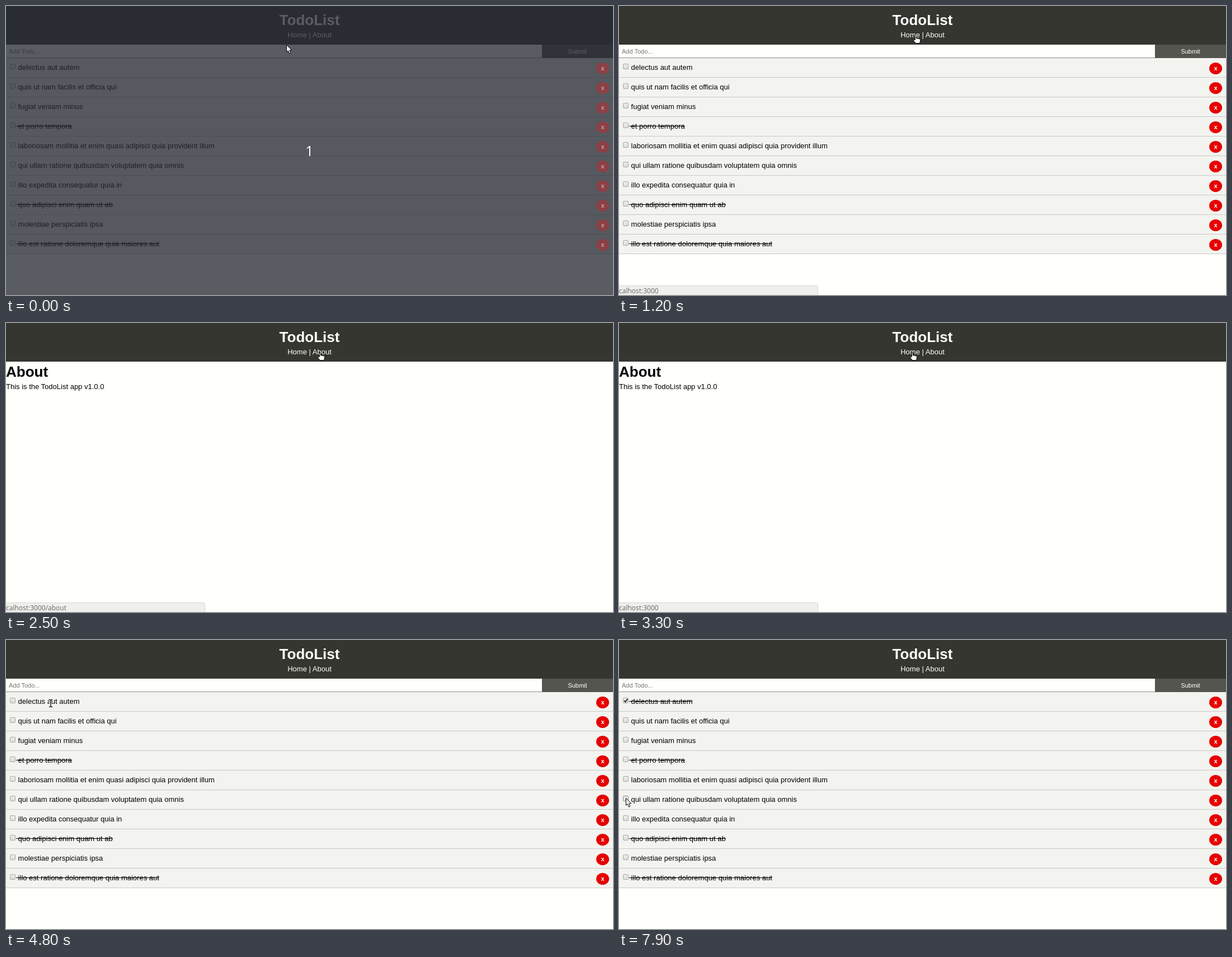
Write an HTML page that moves like this. It is 1085 by 516 pixels and loops after 8000 ms.

```html
<!DOCTYPE html>
<html lang="en">
<head>
<meta charset="utf-8">
<title>TodoList</title>
<style>
html, body { margin: 0; width: 100%; height: 100%; overflow: hidden; }
body { position: relative; background: #fffffc; color: #000; font: 13px/15px "Liberation Sans", Arial, sans-serif; }
body * { box-sizing: border-box; }
h1, p { margin: 0; }
h1 { font-size: 26px; line-height: 30px; }
header { height: 69px; padding-top: 10px; background: #363631; color: #fffffc; text-align: center; }
header p { margin-top: 4px; }
[hidden] { display: none !important; }
.form { display: flex; height: 24px; font-size: 11px; line-height: 24px; }
.field { width: 958px; padding-left: 5px; border-bottom: 1px solid #8c8c89; color: #757573; }
.submit { flex: 1; background: #555550; color: #fffffc; text-align: center; }
.row { position: relative; height: 35px; padding: 9px 0 0 18px; background: #f3f3f0; border-bottom: 1px solid #c9c9c6; white-space: pre; }
.done span { text-decoration: line-through; }
.box { position: absolute; left: 7px; top: 10px; width: 10px; height: 10px; border: 1px solid #a9a9a7; border-radius: 2px; background: linear-gradient(#ececea, #dcdcda); }
.box.hover { border-color: #8e8e8c; }
.box svg { position: absolute; left: 0; top: 0; }
.del { position: absolute; left: 1055px; top: 8px; width: 23px; height: 21px; border-radius: 50%; background: #e60000; color: #fffffc; font: bold 11px/20px "Liberation Sans", Arial, sans-serif; text-align: center; }
.counting .del { z-index: 2; background: #8c4046; color: #bda3a6; }
#about { padding-top: 3px; }
#about p { margin-top: 4px; }
#status { position: absolute; left: 0; top: 499px; width: 356px; height: 18px; border: solid #d6d6d3; border-width: 1px 1px 0 0; border-radius: 0 4px 0 0; background: #efefec; color: #666664; font: 12px/17px "Open Sans", "Noto Sans", sans-serif; }
#shade { position: absolute; inset: 0; z-index: 1; background: rgba(38, 41, 50, .76); }
#count { position: absolute; z-index: 3; left: 0; right: 0; top: 241px; color: #fff; font: 25px/34px "Open Sans", "Noto Sans", sans-serif; text-align: center; }
#cursor { position: absolute; z-index: 4; left: 0; top: 0; overflow: visible; }
</style>
</head>
<body>
<header><h1>TodoList</h1><p>Home | About</p></header>
<main id="home">
  <div class="form"><div class="field">Add Todo...</div><div class="submit">Submit</div></div>
  <div id="list"></div>
</main>
<main id="about"><h1>About</h1><p>This is the TodoList app v1.0.0</p></main>
<div id="status"></div>
<div id="shade"></div>
<div id="count">1</div>
<svg id="cursor" width="14" height="18" fill="#fff" stroke="#000" stroke-linejoin="round">
  <path id="arrow" d="M.5 .5V13.3L3.4 10.7L5.6 16L7.9 15L5.7 9.9H9.8Z"/>
  <path id="hand" d="M3.3 7.5V1.6Q3.3 .5 4.4 .5T5.5 1.6V5L7.6 4.8L9.7 5.4L11.6 6Q12.5 6.4 12.5 7.6V10L11.4 13.5H4.4L.7 9Q.2 7.8 1.4 7.2Z"/>
  <g id="beam" fill="none">
    <path id="stem" d="M1 1.5H2.5L4 2.5L5.5 1.5H7M4 2.5V13.5M1 14.5H2.5L4 13.5L5.5 14.5H7" stroke="#fff" stroke-width="3"/>
    <use href="#stem" style="display:none"/>
    <path d="M1 1.5H2.5L4 2.5L5.5 1.5H7M4 2.5V13.5M1 14.5H2.5L4 13.5L5.5 14.5H7" stroke-width="1.3"/>
  </g>
</svg>
<script>
const LOOP = 8000, STEP = 100;
const $ = id => document.getElementById(id);
const todos = [
  'delectus aut autem', 'quis ut nam facilis et officia qui', 'fugiat veniam minus',
  '*et porro tempora', 'laboriosam mollitia et enim quasi adipisci quia provident illum',
  'qui ullam ratione quibusdam voluptatem quia omnis', 'illo expedita consequatur quia in',
  '*quo adipisci enim quam ut ab', 'molestiae perspiciatis ipsa',
  '*illo est ratione doloremque quia maiores aut'
];
// A leading star marks a finished todo.
$('list').innerHTML = todos.map(s =>
  `<div class="row${s[0] === '*' ? ' done' : ''}"><i class="box"></i><span> ${s.replace('*', '')}</span><b class="del">x</b></div>`
).join('');
const rows = [...document.querySelectorAll('.row')];
const boxes = rows.map(r => r.firstChild);
boxes[0].innerHTML = '<svg width="9" height="9" fill="none" stroke="#333" stroke-width="2"><path d="M1.2 4.2L3.4 6.4L7.4 1.2"/></svg>';
const tick = boxes[0].firstChild;

// time, left, top, shape
const path = [
  [0, 501, 69, 'arrow'], [100, 505, 63, 'arrow'], [400, 521, 59, 'arrow'], [500, 521, 59, 'arrow'],
  [700, 528, 57, 'arrow'], [800, 528, 57, 'arrow'], [900, 524, 55, 'hand'], [1200, 526, 53, 'hand'],
  [1800, 526, 53, 'hand'], [2000, 540, 49, 'hand'], [2200, 557, 53, 'hand'], [3000, 557, 53, 'hand'],
  [3100, 531, 53, 'hand'], [3200, 531, 53, 'hand'], [3300, 520, 53, 'hand'], [3700, 520, 53, 'hand'],
  [3800, 480, 66, 'arrow'], [4200, 160, 108, 'arrow'], [4300, 120, 110, 'beam'], [4500, 120, 110, 'beam'],
  [4800, 76, 105, 'beam'], [5100, 40, 106, 'beam'], [5200, 24, 106, 'arrow'], [5400, 13, 107, 'arrow'],
  [5500, 13, 107, 'arrow'], [5600, 12, 108, 'arrow'], [6300, 12, 108, 'arrow'], [7000, 12, 273, 'arrow'],
  [7100, 12, 273, 'arrow'], [7400, 12, 287, 'arrow'], [7600, 12, 287, 'arrow'], [7900, 12, 282, 'arrow']
];

function cursorAt(t) {
  const i = path.findLastIndex(k => k[0] <= t);
  const a = path[i], b = path[i + 1] || a;
  const u = a === b ? 0 : (t - a[0]) / (b[0] - a[0]);
  return [a[1] + (b[1] - a[1]) * u, a[2] + (b[2] - a[2]) * u, a[3]].map(v => v.toFixed ? Math.round(v) : v);
}

function draw(now) {
  const t = Math.floor(now % LOOP / STEP) * STEP;
  const within = (a, b) => t >= a && t < b;
  const show = (id, on) => $(id).toggleAttribute('hidden', !on);

  const counting = t < 100;
  document.body.classList.toggle('counting', counting);
  show('shade', counting);
  show('count', counting);

  const about = within(2500, 3500);
  show('about', about);
  show('home', !about);
  show('status', within(1100, 4000));
  $('status').textContent = 'calhost:3000' + (within(2000, 3100) ? '/about' : '');

  const checked = t >= 5900;
  rows[0].classList.toggle('done', checked);
  tick.style.display = checked ? '' : 'none';

  const [x, y, shape] = cursorAt(t);
  $('cursor').style.transform = `translate(${x}px, ${y}px)`;
  for (const id of ['arrow', 'hand', 'beam']) $(id).style.display = id === shape ? '' : 'none';
  boxes.forEach((box, i) => {
    const top = 103 + 35 * i;
    box.classList.toggle('hover', shape === 'arrow' && x < 17 && y >= top && y < top + 10);
  });
  requestAnimationFrame(draw);
}
draw(performance.now());
</script>
</body>
</html>
```
